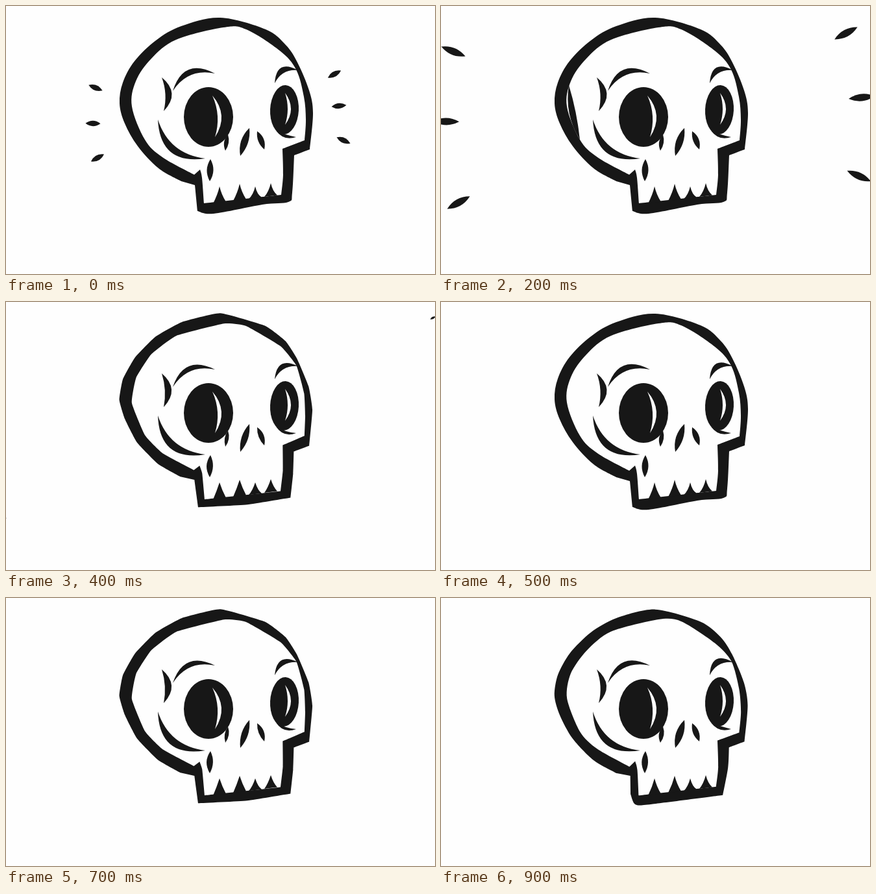
Animation of 661 by 413 pixels, one loop 1 s. Source, as an HTML page with a canvas:

```html
<!DOCTYPE html>
<html lang="en">
<head>
<meta charset="utf-8">
<title>Skull</title>
<style>
html, body { margin: 0; width: 100%; height: 100%; overflow: hidden; background: #fefefe; }
canvas { display: block; }
</style>
</head>
<body>
<canvas id="stage" width="661" height="413"></canvas>
<script>
const ctx = document.getElementById('stage').getContext('2d');
const INK = '#171717', PAPER = '#fefefe';

// "x y" pairs; a slash makes the point before it a corner.
const dome = `270 270 235 250 203 216 183 181 175 150 180 118 198 85 231 53 270 31 330 18
  400 36 431 60 449 87 467 130 473 165 468 221 / 444 230 /`;
const cavity = `299 252 / 302 265 305 304 / 424 291 / 427 260 426 220 / 460 207 / 462 175 459 140
  447 98 422 69 370 36 335 33 262 52 224 81 200 116 194 155 214 206 241 233 290 260`;
const jaws = {
  round: '441 288 435 302 395 306 320 320 295 316 / 291 276',
  sharp: '442 262 434 304 / 325 318 300 318 292 303 / 292 274',
  rough: '442 265 438 302 / 372 313 297 316 / 290 275'
};

// Start, end, and how far each side bulges
const creases = {
  cheek: [234, 175, 307, 235, 26, 15],
  temple: [240, 110, 243, 162, -14, -4],
  leftBrow: [257, 131, 322, 104, -21, -12],
  rightBrow: [414, 119, 450, 99, -16, -7],
  leftNostril: [375, 188, 361, 231, 6, -5],
  rightNostril: [387, 193, 398, 221, -5, 4],
  dimple: [315, 236, 314, 270, 5, -5],
  underEye: [416, 192, 447, 202, 6, 1],
  eyeTail: [342, 198, 338, 223, -3, 4]
};
const shines = [[318, 138, 322, 202, -12, -6], [430, 134, 430, 183, -9, -4]];
const eyes = [[312, 171, 38, 46, 0], [429, 160, 22, 38, 0.05]];
const teeth = [[329, 278], [360, 274], [384, 278], [408, 273]];
const chip = [197, 122, 214, 206, 8, -2];

// Centres at the first three steps, tilt in degrees, late drop
const sparks = [
  [138, 126, 79, 106, 19, 70, 22, 0],
  [134, 181, 80, 179, 8, 178, 1, 0],
  [141, 234, 93, 264, 27, 303, -29, 14],
  [506, 105, 551, 80, 624, 42, -28, 0],
  [513, 154, 567, 149, 648, 141, -6, 0],
  [520, 207, 572, 225, 644, 262, 24, 0]
];
const lengths = [23, 52, 40, 24, 9];
const glide = [0, 0, 0, 0.35, 0.46];

function seeded(seed) {
  return () => (seed = seed * 16807 % 2147483647) / 2147483647 - 0.5;
}

function outline(text, curve, shift) {
  const path = new Path2D();
  let last;
  for (const run of text.split('/')) {
    const n = run.trim().split(/\s+/).map(Number);
    const pts = last ? [last] : [];
    for (let i = 0; i < n.length; i += 2) pts.push([n[i] + shift(), n[i + 1] + shift()]);
    if (!last) path.moveTo(...pts[0]);
    for (let i = 0; i < pts.length - 1; i++) {
      const b = pts[i], c = pts[i + 1], a = pts[i - 1] || b, d = pts[i + 2] || c;
      const near = k => b[k] + (c[k] - a[k]) * curve / 6;
      const far = k => c[k] - (d[k] - b[k]) * curve / 6;
      path.bezierCurveTo(near(0), near(1), far(0), far(1), c[0], c[1]);
    }
    last = pts[pts.length - 1];
  }
  path.closePath();
  return path;
}

function leaf([x, y, u, v, left, right], shift = () => 0) {
  const path = new Path2D();
  const dx = u - x, dy = v - y, len = Math.hypot(dx, dy);
  const mid = bulge => {
    const k = 2 * (bulge + shift()) / len;
    return [(x + u) / 2 - dy * k, (y + v) / 2 + dx * k];
  };
  path.moveTo(x, y);
  path.quadraticCurveTo(...mid(left), u, v);
  path.quadraticCurveTo(...mid(right), x, y);
  return path;
}

function eye([x, y, rx, ry, turn]) {
  const path = new Path2D();
  path.ellipse(x, y, rx, ry, turn, 0, 7);
  return path;
}

function tooth([x, y], curve) {
  const path = new Path2D();
  const gum = px => 304 - (px - 322) * 0.13;
  const l = x - 10, r = x + 10, bend = 5 - 2 * curve;
  path.moveTo(l, gum(l));
  path.quadraticCurveTo(x - bend, y + 13, x, y);
  path.quadraticCurveTo(x + bend, y + 13, r, gum(r));
  return path;
}

function makePose(jaw, curve, wobble, extra = []) {
  const random = seeded(77);
  const shift = () => random() * wobble;
  return {
    hull: outline(dome + jaw, curve, shift),
    face: outline(cavity, curve, shift),
    marks: [
      ...Object.values(creases).concat(extra).map(c => leaf(c, shift)),
      ...eyes.map(eye),
      ...teeth.map(t => tooth(t, curve))
    ],
    shines: shines.map(s => leaf(s))
  };
}

const round = makePose(jaws.round, 1, 0);
const chipped = makePose(jaws.round, 1, 0, [chip]);
const sharp = makePose(jaws.sharp, 0.8, 1);
const rough = makePose(jaws.rough, 0.4, 2);
const poses = [round, sharp, chipped, sharp, rough, round, sharp, rough, round, sharp];

function spark([x0, y0, x1, y1, x2, y2, tilt, drop], step) {
  const g = glide[step];
  const x = [x0, x1, x2][step] ?? x2 + (x2 - x1) * g;
  const y = [y0, y1, y2][step] ?? y2 + (y2 - y1) * g + drop;
  const half = lengths[step] / 2, angle = tilt * Math.PI / 180;
  const dx = Math.cos(angle) * half, dy = Math.sin(angle) * half;
  const fat = Math.min(5.5, half * 0.36);
  return leaf([x - dx, y - dy, x + dx, y + dy, fat, -fat]);
}

function paint(color, paths) {
  ctx.fillStyle = color;
  paths.forEach(p => ctx.fill(p));
}

function draw(time) {
  const step = Math.floor(time % 1000 / 100);
  const pose = poses[step];
  ctx.fillStyle = PAPER;
  ctx.fillRect(0, 0, 661, 413);
  paint(INK, [pose.hull]);
  paint(PAPER, [pose.face]);
  paint(INK, pose.marks);
  paint(PAPER, pose.shines);
  if (step < lengths.length) paint(INK, sparks.map(s => spark(s, step)));
}

const start = performance.now();
function tick() {
  draw(performance.now() - start);
  requestAnimationFrame(tick);
}
tick();
</script>
</body>
</html>
```
